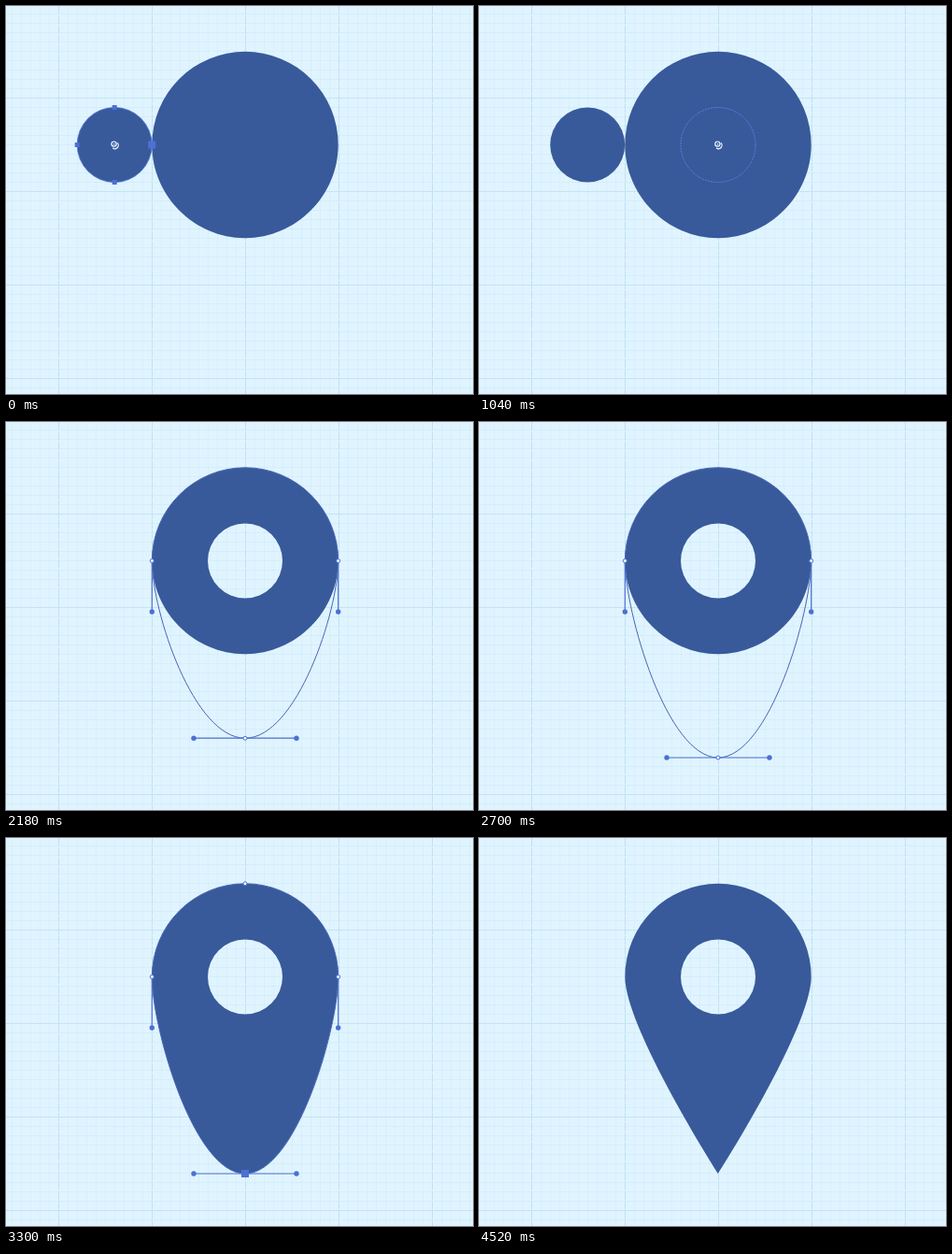
These frames come from a looping animation (500 by 415 pixels, 5520 ms). An HTML page with a canvas:

```html
<!DOCTYPE html>
<html lang="en">
<head>
<meta charset="utf-8">
<title>Drawing a map pin</title>
<style>
html, body { margin: 0; width: 100%; height: 100%; overflow: hidden; background: #e0f4ff; }
canvas { display: block; width: 500px; height: 415px; }
</style>
</head>
<body>
<canvas id="stage" width="500" height="415"></canvas>
<script>
const ctx = document.getElementById('stage').getContext('2d');
const LOOP = 5520, STEP = 87;
const FILL = '#385a9b', EDIT = '#4c70d3', LINE = '#4866b4', PAPER = '#e0f4ff';
const CX = 256, CY = 148.5, R = 99.7, HOLE = 40, SMALL_X = 116.2;
const HANDLE = 54.5, CIRCLE_END = CY + R, TIP = 359;

// Times of the drawing steps, in ms
const T = {
  dragCopy: 260, copyThere: 960, dropCopy: 1220, cut: 1390,
  selectBody: 1570, pullTip: 1700, tipThere: 2357, dropTip: 2960,
  sharpen: 3740, deselect: 4350
};

function ease(t, from, to) {
  const u = Math.min(1, Math.max(0, (t - from) / (to - from)));
  return u * u * (3 - 2 * u);
}

function line(x1, y1, x2, y2, color, width = 1) {
  ctx.strokeStyle = color;
  ctx.lineWidth = width;
  ctx.beginPath();
  ctx.moveTo(x1, y1);
  ctx.lineTo(x2, y2);
  ctx.stroke();
}

function disc(x, y, r, color) {
  ctx.fillStyle = color;
  ctx.beginPath();
  ctx.arc(x, y, r, 0, 7);
  ctx.fill();
}

function ring(x, y, r, color, width = 1) {
  ctx.strokeStyle = color;
  ctx.lineWidth = width;
  ctx.beginPath();
  ctx.arc(x, y, r, 0, 7);
  ctx.stroke();
}

function square(x, y, size = 5) {
  ctx.fillStyle = EDIT;
  ctx.fillRect(x - size / 2, y - size / 2, size, size);
}

function hollow(x, y) {
  disc(x, y, 2, '#f4fbff');
  ring(x, y, 2, EDIT);
}

function handle(x1, y1, x2, y2) {
  line(x1, y1, x2, y2, EDIT, 1.2);
  disc(x2, y2, 2.7, EDIT);
}

function centreMark(x, color) {
  ring(x - 0.6, CY - 0.9, 2.6, color, 1.2);
  disc(x - 0.4, CY - 0.7, 0.8, color);
  ctx.beginPath();
  ctx.arc(x + 0.5, CY + 0.5, 3.6, -0.8, 2.3);
  ctx.stroke();
}

function drawPaper() {
  ctx.fillStyle = PAPER;
  ctx.fillRect(0, 0, 500, 415);
  for (let x = 6.5; x < 500; x += 10) line(x, 0, x, 415, 'rgba(170,215,235,.16)');
  for (let y = 8.5; y < 415; y += 10) line(0, y, 500, y, 'rgba(170,215,235,.24)');
  for (let y = 98.5; y < 415; y += 100) line(0, y, 500, y, '#c3e4f3');
  ctx.setLineDash([9, 1.5]);
  for (let x = 56.5; x < 500; x += 100) line(x, 0, x, 415, '#bfe2f1');
  ctx.setLineDash([]);
}

// Upper half circle, lower half pulled to a tip with the given handle length
function pinPath(tip, reach) {
  const left = CX - R, right = CX + R, low = CY + HANDLE;
  ctx.moveTo(left, CY);
  ctx.arc(CX, CY, R, Math.PI, 0);
  ctx.bezierCurveTo(right, low, CX + reach, tip, CX, tip);
  ctx.bezierCurveTo(CX - reach, tip, left, low, left, CY);
  ctx.closePath();
}

function drawBody(tip, reach, cut) {
  ctx.fillStyle = FILL;
  ctx.beginPath();
  pinPath(tip, reach);
  if (cut) {
    ctx.moveTo(CX + HOLE, CY);
    ctx.arc(CX, CY, HOLE, 0, 7);
  }
  ctx.fill('evenodd');
}

function outlineBody(tip, reach) {
  ctx.strokeStyle = LINE;
  ctx.lineWidth = 1;
  ctx.beginPath();
  pinPath(tip, reach);
  ctx.stroke();
}

function selectCircle(x, big) {
  ring(x, CY, HOLE, EDIT, 0.8);
  square(x, CY - HOLE);
  square(x, CY + HOLE);
  square(x - HOLE, CY);
  square(x + HOLE, CY, big ? 8 : 5);
}

function drawHandles(tip, reach) {
  for (const side of [-1, 1]) {
    const x = CX + side * R;
    handle(x, CY, x, CY + HANDLE);
    if (reach) handle(CX, tip, CX + side * reach, tip);
    hollow(x, CY);
  }
}

function drawCopying(t) {
  drawBody(CIRCLE_END, HANDLE, t >= T.cut);
  if (t < T.dropCopy) disc(SMALL_X, CY, HOLE, FILL);
  if (t < T.dragCopy) {
    selectCircle(SMALL_X, true);
    centreMark(SMALL_X, '#f0f8ff');
  } else if (t < T.dropCopy) {
    const x = SMALL_X + (CX - SMALL_X) * ease(t, T.dragCopy, T.copyThere);
    ctx.setLineDash([2, 1]);
    ring(x, CY, HOLE, '#5c7de0');
    ctx.setLineDash([]);
    centreMark(x, '#f0f8ff');
  } else {
    selectCircle(CX, false);
    centreMark(CX, t < T.cut ? '#f0f8ff' : '#5a7fc4');
  }
}

function drawPulling(t) {
  const tip = CIRCLE_END + (TIP - CIRCLE_END) * ease(t, T.pullTip, T.tipThere);
  drawBody(CIRCLE_END, HANDLE, true);
  outlineBody(tip, HANDLE + 0.5);
  drawHandles(tip, HANDLE + 0.5);
  hollow(CX, tip);
}

function drawShaping(t) {
  const reach = t < T.sharpen ? HANDLE + 0.5 : 0;
  drawBody(TIP, reach, true);
  if (t >= T.deselect) return;
  outlineBody(TIP, reach);
  drawHandles(TIP, reach);
  hollow(CX, CY - R);
  square(CX, TIP, 8);
}

function draw(t) {
  drawPaper();
  if (t < T.selectBody) drawCopying(t);
  else if (t < T.dropTip) drawPulling(t);
  else drawShaping(t);
}

const start = performance.now();
function tick() {
  const t = (performance.now() - start) % LOOP;
  draw(Math.floor(t / STEP) * STEP);
  requestAnimationFrame(tick);
}
tick();
</script>
</body>
</html>
```
